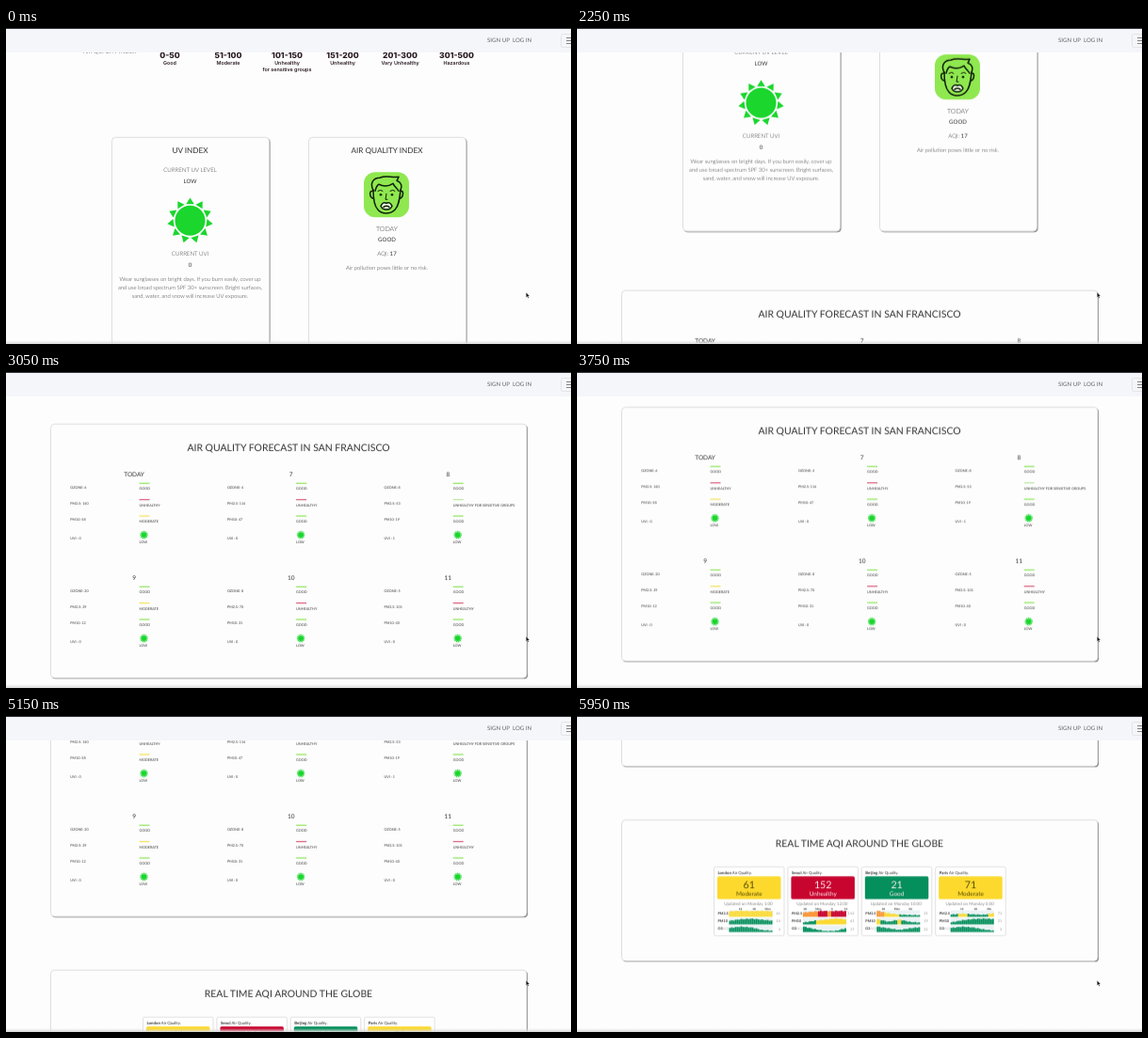
These frames come from a looping animation (600x336 px, 6000 ms). An HTML page:

```html
<!DOCTYPE html>
<html lang="en">
<head>
<meta charset="utf-8">
<title>Air quality dashboard</title>
<style>
  html, body { margin: 0; width: 100%; height: 100%; overflow: hidden; background: #fdfdfd; }
  svg { display: block; width: 600px; height: 336px; }
  text { font-family: Lato, "Open Sans", sans-serif; text-rendering: geometricPrecision; }
  .legend { font-family: Inter, Roboto, sans-serif; }
  #page { animation: scroll 6s infinite; }
  @keyframes scroll {
    0% { transform: translateY(0); animation-timing-function: cubic-bezier(.2, .6, .4, 1); }
    10.833%, 33.333% { transform: translateY(-45px); animation-timing-function: cubic-bezier(.33, .15, .67, .54); }
    37.5% { transform: translateY(-125px); animation-timing-function: cubic-bezier(.33, .53, .67, .83); }
    50.833% { transform: translateY(-349px); animation-timing-function: cubic-bezier(.33, .6, .67, 1); }
    54.833%, 79.167% { transform: translateY(-367px); animation-timing-function: cubic-bezier(.4, .2, .67, .53); }
    85.833% { transform: translateY(-461px); animation-timing-function: cubic-bezier(.33, .58, .67, .93); }
    99.167%, 100% { transform: translateY(-621px); }
  }
</style>
</head>
<body>
<svg viewBox="0 0 600 336">
  <defs>
    <linearGradient id="fade" x2="0" y2="1">
      <stop offset="0" stop-color="#ddd" stop-opacity="0"/>
      <stop offset="1" stop-color="#d8d8d8"/>
    </linearGradient>
    <g id="sun" fill="#1ad62d"><circle r="16"/></g>
    <g id="face" fill="none" stroke="#10200a" stroke-width="1.5" stroke-linecap="round" stroke-linejoin="round">
      <rect x="-24" y="-24" width="48" height="48" rx="12" fill="#8fe84f" stroke="none"/>
      <path d="M-14-5C-18-12-14-18-7-18C-1-21 6-18 13-19C12-17 12-16 11-15C16-13 17-9 15-5"/>
      <path d="M-14-5C-14 6-13 12-9 16C-5 21 4 21 9 16C13 12 14 5 15-5"/>
      <path d="M-12-4C-11-8-10-10-8-11C-2-8 4-10 7-12C9-8 11-7 13-4"/>
      <path d="M-14-4C-19-5-18 3-14 4M15-4C19-5 18 3 14 4"/>
      <path d="M-9-4Q-6-6-4-4M4-4Q7-6 9-4M0-1L-1 5H1" stroke-width="1"/>
      <path d="M-6 12C-4 8-2 8 0 9C2 8 4 8 6 12C4 17-4 17-6 12Z" fill="#e6f5dc"/>
      <path d="M-3 13Q0 11 3 13"/>
      <g fill="#10200a" stroke="none"><circle cx="-6" r="1.3"/><circle cx="6" r="1.3"/></g>
    </g>
  </defs>

  <g id="page"></g>

  <rect width="600" height="26" fill="#f5f6fa"/>
  <rect width="600" height="1" fill="#303036"/>
  <g id="nav"></g>
  <rect x="589.5" y="6.5" width="22" height="14" rx="2" fill="none" stroke="#e2e3e8"/>
  <path d="M595 10.5h6M595 13.5h6M595 16.5h6" stroke="#777" stroke-width=".9"/>
  <rect y="332" width="600" height="4" fill="url(#fade)"/>
  <path d="M552.3 281.2v5.2l1.2-1 .9 1.9 .9-.4-.9-1.8h1.6z" fill="#111" stroke="#fff" stroke-width=".3"/>
</svg>

<script>
const $ = id => document.getElementById(id);

// Text placed by the middle of its capitals.
const text = (x, cy, size, str, { anchor = 'middle', weight = 400, fill = '#333', cls = '' } = {}) =>
  `<text class="${cls}" x="${x}" y="${cy + size * 0.36}" font-size="${size}" font-weight="${weight}"
    fill="${fill}" text-anchor="${anchor}">${str}</text>`;
const rect = (x, y, w, h, fill, rx = 0) =>
  `<rect x="${x}" y="${y}" width="${w}" height="${h}" rx="${rx}" fill="${fill}"/>`;
const card = (w, h) => rect(1, 1, w, h, '#777', 4) +
  `<rect width="${w}" height="${h}" rx="4" fill="#fdfdfd" stroke="#d6d6d6" stroke-width=".8"/>`;
const at = (x, y, body) => `<g transform="translate(${x} ${y})">${body}</g>`;

const light = { weight: 300, fill: '#333' };
const left = { anchor: 'start' };

for (let i = 0; i < 11; i++)
  $('sun').innerHTML += `<path d="M-4.3-17.6H4.3L0-24.4Z" transform="rotate(${i * 360 / 11})"/>`;

function legend() {
  const levels = [
    [174, '0-50', 'Good'], [236, '51-100', 'Moderate'], [298.5, '101-150', 'Unhealthy'],
    [357.5, '151-200', 'Unhealthy'], [418.5, '201-300', 'Vary Unhealthy'], [478.5, '301-500', 'Hazardous'],
  ];
  const label = { cls: 'legend', weight: 600, fill: '#2a1a22' };
  return text(82, 25, 6.2, 'AIR QUALITY INDEX', { ...left, ...light }) +
    levels.map(([x, range, name]) =>
      text(x, 29.5, 8.6, range, { ...label, weight: 800 }) + text(x, 37.3, 5.4, name, label)).join('') +
    text(298.5, 44, 5.4, 'for sensitive groups', label);
}

function uvCard() {
  const lines = ['Wear sunglasses on bright days. If you burn easily, cover up',
    'and use broad spectrum SPF 30+ sunscreen. Bright surfaces,',
    'sand, water, and snow will increase UV exposure.'];
  return card(167, 225) + text(83, 13.7, 8.2, 'UV INDEX') +
    text(83, 34.7, 6.15, 'CURRENT UV LEVEL', light) + text(83, 46.7, 6, 'LOW') +
    at(83, 88.5, '<use href="#sun"/>') +
    text(83, 123.7, 6.15, 'CURRENT UVI', light) + text(83, 135.7, 6, '0') +
    lines.map((s, i) => text(83, 150.7 + i * 9, 5.88, s, light)).join('');
}

function airCard() {
  return card(167, 225) + text(83, 13.7, 8.2, 'AIR QUALITY INDEX') +
    at(82.5, 61, '<use href="#face"/>') +
    text(83, 96.7, 7, 'TODAY', light) + text(83, 108.7, 6.1, 'GOOD') +
    text(83, 123.7, 6.1, '<tspan font-weight="300">AQI:</tspan> 17') +
    text(83, 138.7, 5.95, 'Air pollution poses little or no risk.', light);
}

const grades = {
  G: ['GOOD', '#84e44a'], M: ['MODERATE', '#f3e04c'],
  S: ['UNHEALTHY FOR SENSITIVE GROUPS', '#b4e69a'], U: ['UNHEALTHY', '#d6506f'],
};
// day, ozone, PM2.5, PM10, UVI, grade of each pollutant
const days = [
  ['TODAY', 6, 140, 58, 0, 'GUM'], [7, 4, 114, 47, 0, 'GUG'], [8, 8, 53, 19, 1, 'GSG'],
  [9, 20, 29, 12, 0, 'GMG'], [10, 8, 70, 31, 0, 'GUG'], [11, 5, 101, 40, 0, 'GUG'],
];

function dayCell([day, ozone, fine, coarse, uvi, marks], i) {
  const labels = [`OZONE: ${ozone}`, `PM2.5: ${fine}`, `PM10: ${coarse}`];
  const rows = labels.map((s, r) => {
    const [name, color] = grades[marks[r]], y = 67 + r * 17.4;
    return text(20.8, y, 3.75, s, left) + rect(94, y - 4.6, 11, 1.1, color) + text(94, y + 1.8, 3.75, name, left);
  }).join('');
  return at(i % 3 * 166.6, Math.floor(i / 3) * 110,
    text(88.6, 53.5, 6.5, day) + rows + text(20.8, 121.5, 3.75, `UVI : ${uvi}`, left) +
    at(99, 117.8, '<circle r="4.3" fill="#c4f5c9"/><use href="#sun" transform="scale(.185)"/>') +
    text(94, 125.6, 3.75, 'LOW', left));
}

const forecast = () => card(505.5, 270) +
  text(252.5, 24.8, 10.45, 'AIR QUALITY FORECAST IN SAN FRANCISCO') + days.map(dayCell).join('');

const GREEN = '#058f5c', YELLOW = '#fcd92c', ORANGE = '#fb9433', RED = '#c8052f';
const tint = v => v <= 50 ? GREEN : v <= 100 ? YELLOW : v <= 150 ? ORANGE : RED;

// Bars interpolated between a few values, with a small ripple.
function bars(points, top, base) {
  const n = 23;
  let out = rect(16, base - 6.8, 2 * n, 6.8, '#eaf2f5');
  for (let i = 0; i < n; i++) {
    const p = i / n * (points.length - 1), k = Math.floor(p);
    const v = points[k] + (points[k + 1] - points[k]) * (p - k);
    const h = Math.max(0.8, 6.6 * v / top + 0.4 * Math.sin(i * 2.3));
    out += rect(16 + i * 2, base - h, 2, h, tint(v));
  }
  return out;
}

// city, AQI, level, time, axis start, axis words, then per pollutant: current value, top of scale, profile
const cities = [
  ['London', 61, 'Moderate', '1:00', 28, ['12', '18', 'Mon'],
    [61, 68, [60, 66, 62, 65, 61]], [14, 24, [14, 20, 22, 18, 14]], [3, 30, [20, 26, 22, 9, 6]]],
  ['Seoul', 152, 'Unhealthy', '12:00', 18, ['18', 'Mon', '6', '12'],
    [152, 165, [115, 135, 158, 148, 158, 152]], [61, 80, [25, 48, 62, 78, 64]], [17, 30, [26, 14, 4, 6, 20]]],
  ['Beijing', 21, 'Good', '10:00', 23, ['18', 'Mon', '06'],
    [21, 140, [135, 80, 50, 40, 35]], [19, 70, [60, 30, 55, 28, 20]], [21, 30, [26, 18, 10, 18, 24]]],
  ['Paris', 71, 'Moderate', '0:00', 28, ['12', '18', 'Mo'],
    [71, 110, [40, 56, 42, 36, 70]], [21, 30, [10, 20, 26, 28, 26]], [3, 30, [20, 26, 22, 12, 6]]],
];

function widget([city, aqi, level, time, start, axis, ...rows], i) {
  const color = tint(aqi), ink = { fill: color === YELLOW ? '#5c4d08' : '#fbe9ec' };
  const charts = rows.map(([now, top, points], r) => {
    const base = 53 + r * 8.1;
    const name = ['PM2.5', 'PM10', 'O3<tspan font-weight="300" fill="#888">AQI</tspan>'][r];
    return bars(points, top, base) + text(4, base - 3.8, 3.8, name, { ...left, weight: 700 }) +
      text(70.5, base - 3.3, 3.9, now, { anchor: 'end', fill: '#999' });
  }).join('');
  const hours = axis.map((s, k) => text(start + k * 14.5, 44.4, 3, s, { weight: 700 })).join('');
  return at(98 + i * 78.4, 50,
    `<rect width="74.5" height="73" rx="1.5" fill="#fff" stroke="#d6d6d6" stroke-width=".7"/>` +
    text(4, 6.6, 4.3, `<tspan font-weight="700">${city}</tspan> Air Quality.`, left) +
    rect(3.5, 10, 67.5, 24.3, color, 1.6) +
    text(37.3, 18.8, 10.7, aqi, ink) + text(37.3, 28.3, 6.45, level, ink) +
    text(36.5, 38.6, 4.6, `Updated on Monday ${time}`, { fill: '#888' }) + hours + charts);
}

const globe = () => card(505.5, 150) +
  text(252.5, 24.8, 10.4, 'REAL TIME AQI AROUND THE GLOBE') + cities.map(widget).join('');

$('page').innerHTML = legend() + at(112.5, 116.5, uvCard()) + at(321.5, 116.5, airCard()) +
  at(47.5, 404.5, forecast()) + at(47.5, 731.5, globe());
$('nav').innerHTML = text(511, 12.8, 6.1, 'SIGN UP', { ...left, fill: '#666' }) +
  text(538, 12.8, 6.1, 'LOG IN', { ...left, fill: '#666' });
</script>
</body>
</html>
```
